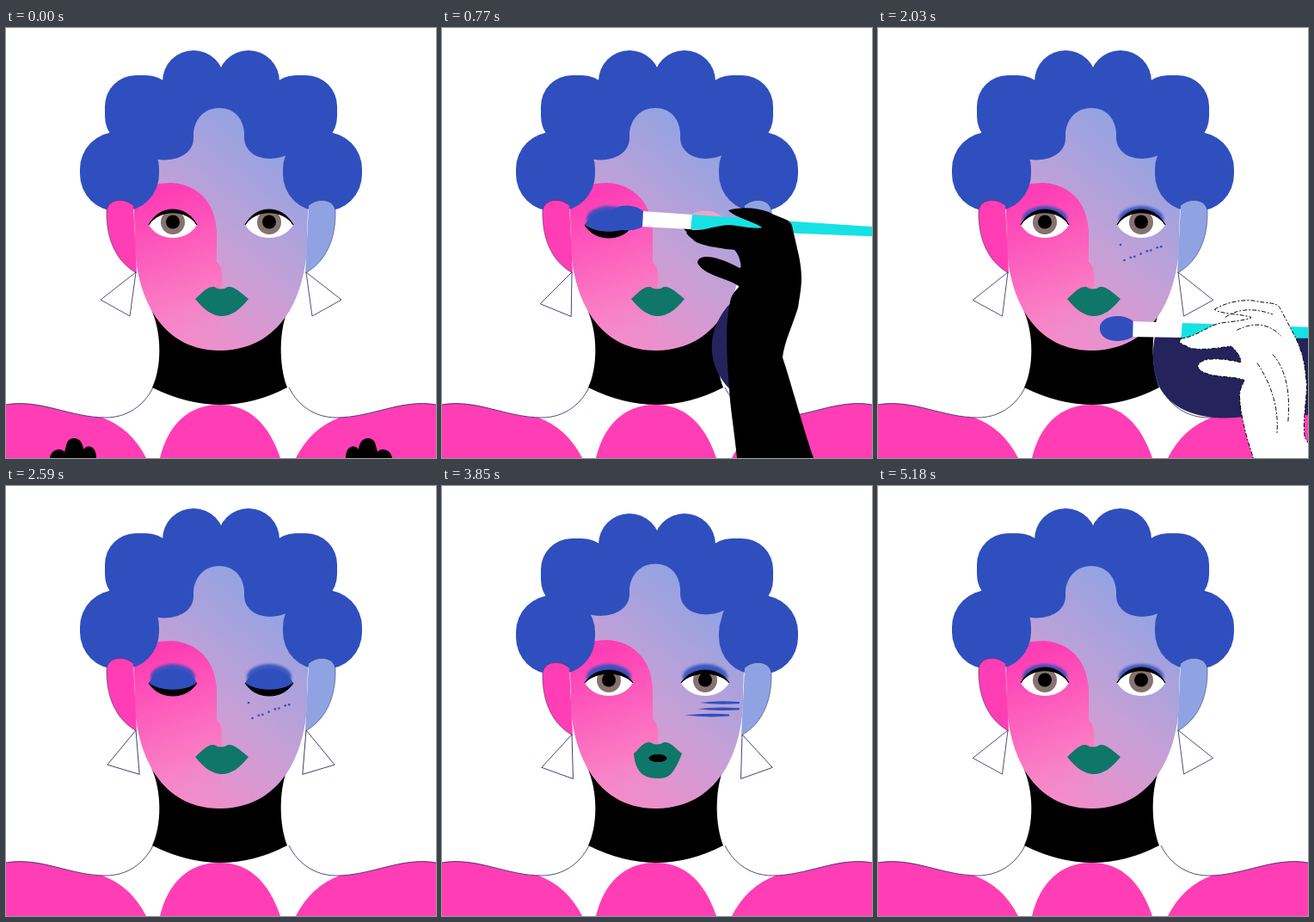
Write an HTML page that moves like this. It is 500 px wide and 500 px high and loops after 5250 ms.

```html
<!DOCTYPE html>
<html lang="en">
<head>
<meta charset="utf-8">
<style>
html, body { margin: 0; width: 100%; height: 100%; overflow: hidden; background: #fff }
svg { display: block; width: 100vw; height: 100vh }
</style>
</head>
<body>
<svg id="stage" viewBox="0 0 500 500"></svg>
<script>
const LOOP = 5250, STEP = 70;
const BLUE = '#2f4fbe', PINK = '#ff3eb5', NAVY = '#25235c', SKY = '#8fa3e3';
const stage = document.getElementById('stage');

const mix = (a, b, u) => a + (b - a) * u;
function ease(t, from, to) {
  const u = Math.min(1, Math.max(0, (t - from) / (to - from)));
  return u * u * (3 - 2 * u);
}
// Rises to 1 after `from` and falls back to 0 before `to`.
const span = (t, from, to, fade) => ease(t, from, from + fade) - ease(t, to - fade, to);

const shape = (d, fill, more = '') => `<path d="${d}" fill="${fill}" ${more}/>`;
const ball = (x, y, r, fill) => `<circle cx="${x}" cy="${y}" r="${r}" fill="${fill}"/>`;
const curl = (x, y, size, r) => `<rect x="${x}" y="${y}" width="${size}" height="${size}" rx="${r}" fill="${BLUE}"/>`;
const group = (transform, body) => `<g transform="${transform}">${body}</g>`;
const move = (x, y, body) => group(`translate(${x} ${y})`, body);
const flip = body => group('translate(500 0) scale(-1 1)', body);
const both = body => body + flip(body);
const line = (color, width) => `stroke="${color}" stroke-width="${width}"`;

const FACE = 'M147 166H353L350 240C352 300 326 374 250 375S148 300 150 240Z';
const FOREHEAD = 'M168 151C190 158 218 150 218 128V122C220 104 232 93 248 93S276 104 277 122V128C278 150 305 158 328 147Q320 165 330 190H170Q177 165 168 151Z';
const EAR = 'M148 206C135 196 119 200 117 212C116 245 128 272 152 285';
const BLUSH = 'M120 195Q170 180 192 180C225 182 245 205 245 240V272Q250 276 251 284V376H120Z';
const FLAT_HAND = 'M349 500L350 470C340 440 330 420 331 380L334 300C336 288 348 288 350 297L354 336L358 262C358 247 369 246 373 252C374 237 388 236 392 244L395 255C399 249 411 252 412 262L422 290C432 340 436 380 433 420C431 440 430 470 432 500V800H349Z';
const GRIP_HAND = 'M333 212C345 208 365 208 380 214C395 222 405 222 407 230L415 265C420 290 418 300 414 325C408 345 398 365 396 383C405 410 420 465 432 500L470 640H360L343 500C340 470 335 440 334 420C332 390 328 350 335 318C338 305 346 303 345 300C330 290 305 288 297 273C298 262 318 264 346 279C350 279 345 262 340 258C320 256 295 252 291 245C281 238 283 234 292 235C305 236 320 229 335 229C350 231 368 234 372 232C365 226 340 220 333 212Z';
const WIPE_HAND = 'M142 500C160 455 172 440 185 400C192 378 205 372 212 363C225 345 250 310 266 290C278 274 297 273 299 282C298 300 270 330 262 345C272 335 298 290 312 279C325 270 338 278 334 292L333 296C344 295 344 305 338 313L320 345C326 342 338 338 336 350C332 375 300 410 291 430C275 440 255 455 245 473L230 500L150 800H20Z';
const CREASES = 'M343 224Q368 215 397 235M352 242Q385 235 400 262M365 285Q380 330 366 370M385 280Q400 310 382 360';

const DEFS = `<defs>
  <linearGradient id="skin" gradientUnits="userSpaceOnUse" x1="170" y1="350" x2="330" y2="150">
    <stop stop-color="#f98ac8"/><stop offset=".5" stop-color="#c6a0d6"/><stop offset="1" stop-color="#93a3e2"/></linearGradient>
  <linearGradient id="blush" gradientUnits="userSpaceOnUse" x1="165" y1="200" x2="225" y2="370">
    <stop stop-color="${PINK}"/><stop offset=".7" stop-color="#fa7dc4"/><stop offset="1" stop-color="#f58ac8" stop-opacity="0"/></linearGradient>
  <filter id="soft"><feGaussianBlur stdDeviation="1.6"/></filter>
  <clipPath id="face">${shape(FACE, '#000')}</clipPath></defs>`;

const BODY = both(shape('M0 438C40 431 75 453 112 453Q145 465 163 500H0Z', PINK))
  + shape('M179 500C188 462 212 438 248 438S306 462 319 500Z', PINK)
  + shape('M160 300H338Q334 313 329 325C317 350 317 392 327 418Q250 458 170 418C181 395 182 355 168 325Z', '#000')
  + both(shape('M171 418C160 440 140 453 116 453C75 453 40 431 0 438', 'none', line(NAVY, .8)));

const HAIR = both(ball(218, 62, 36, BLUE) + curl(115, 55, 84, 36)) + shape('M150 75H350V180H150Z', BLUE);
const LOBES = both(curl(86, 121, 92, 43));
const EARRING = shape('M151 284L110 316L144 335Z', '#fff', line(NAVY, .8));
const NECK_SHADE = shape('M337 318C306 350 304 395 342 427Z', NAVY);
const ARM_SHADE = shape('M322 358H500V450H437C400 458 345 455 326 415C317 390 320 370 322 358Z', NAVY);
const BRUSH = shape('M290 217L620 239V247L289 234Z', '#16e2e4')
  + shape('M233 213L291 217L289 234L232 231Z', '#fff')
  + shape('M234 213C222 202 195 205 195 220C195 238 222 238 233 231Z', BLUE);

function eye(close, shadow, lid, id) {
  const arc = y => `M166 229C178 ${y} 210 ${y} 222 229`;
  const low = mix(210, 249, close), high = mix(205, 240, close);
  const back = y => `C210 ${y} 178 ${y} 166 229Z`;
  return `<clipPath id="${id}"><path d="${arc(low) + back(249)}"/></clipPath>`
    + (shadow ? `<ellipse cx="194" cy="222" rx="26" ry="15" fill="${BLUE}" opacity=".9" filter="url(#soft)"/>` : '')
    + `<g clip-path="url(#${id})"><path d="M160 200h70v50h-70z" fill="#fff"/>${ball(194, 226, 14, '#86726f')}${ball(194, 225.5, 8, '#000')}</g>`
    + (close > .1 ? shape(arc(207) + back(low), shadow ? BLUE : lid) : '')
    + shape(arc(high) + back(low), '#000', line('#000', 1));
}

function lips(purse) {
  const n = (a, b) => mix(a, b, purse);
  const l = n(220, 223), r = n(282, 279), y = n(315, 311), top = n(301, 298), low = n(335, 340);
  const w = n(21, 26), side = n(328, 336);
  return shape(`M${l} ${y}C${l + 8} ${y - 7} 234 ${top - 1} 242 ${top}Q250 ${top + 5} 258 ${top}C266 ${top - 1} ${r - 9} ${y - 7} ${r} ${y}
    C${r - 10} ${side} ${251 + w * .5} ${low} 251 ${low}S${251 - w} ${side} ${l} ${y}Z`, '#0f766a')
    + (purse > .3 ? `<ellipse cx="251" cy="316.5" rx="${n(-3, 10.5)}" ry="${n(-1, 4.5)}" fill="#000"/>` : '');
}

function marks(t) {
  let out = '';
  if (t < 2980)
    for (let i = 0; i < Math.min(9, (t - 1820) / 21); i++)
      out += ball(282 + i * .618 % 1 * 50, 252 + i * .39 % 1 * 19, 1.3, BLUE);
  else if (t < 4480)
    for (let i = 0; i < 3; i++) {
      const x = 300 - i * i * 6 + i * 6, y = 252 + i * 7.3, end = x + 46 * ease(t, 2940, 3080);
      out += shape(`M${x - i * 3} ${y}Q${x + 20} ${y - 3} ${end} ${y - 1}V${y + 1}Q${x + 20} ${y + 3} ${x - i * 3} ${y}Z`, BLUE);
    }
  return out;
}

function eyeBrush(t) {
  const away = 1 - span(t, 630, 1680, 140);
  const stroke = 8 * (1 - Math.cos((t - 770) / 280 * 2 * Math.PI));
  const x = 108 * ease(t, 1050, 1190) + stroke + 300 * away;
  return (x < 40 ? NECK_SHADE : '') + move(x, 140 * away, BRUSH + shape(GRIP_HAND, '#000'));
}

function cheekBrush(t) {
  const away = 1 - span(t, 1750, 2240, 140), drop = ease(t, 1890, 2030);
  const x = mix(93, 63, drop) + 280 * away, y = mix(46, 126, drop) + 120 * away;
  const ink = line('#000', .9) + ' stroke-dasharray="5 2 2 2"';
  const turned = (angle, body) => group(`translate(${x} ${y}) rotate(${angle} 290 225)`, body);
  return (drop > .5 && away < .5 ? ARM_SHADE : '') + turned(-2, BRUSH)
    + turned(-15, shape(GRIP_HAND, '#fff', ink) + shape(CREASES, 'none', ink));
}

function pat(t) {
  const away = 1 - span(t, 70, 560, 160);
  return both(move(4 + 33 * away, 270 * away - 26 - 6 * Math.cos((t - 280) / 140 * Math.PI), shape(FLAT_HAND, '#000')));
}

function smear(t) {
  const away = 1 - span(t, 2870, 3360, 200);
  return (away < .1 ? NECK_SHADE : '') + move(22 * away, 280 * away, shape(FLAT_HAND, '#000'));
}

function wipe(t) {
  const away = 1 - span(t, 4130, 5040, 300), rub = Math.sin((t - 4480) / 280 * 2 * Math.PI);
  return move(-80 * away - 8 * rub, 310 * away + 8 * rub, ball(316, 290, 57, '#fff') + shape(WIPE_HAND, '#000'));
}

function hands(t) {
  if (t <= 560) return pat(t);
  if (t <= 1680) return eyeBrush(t);
  if (t <= 2240) return cheekBrush(t);
  if (t <= 3360) return smear(t);
  return wipe(t);
}

function draw(t) {
  const tilt = span(t, 3220, 4130, 270), purse = span(t, 2870, 4130, 270);
  const close = Math.max(span(t, 140, 560, 70), span(t, 630, 1680, 70), span(t, 2450, 2660, 70),
    span(t, 4060, 5110, 140), .12 * tilt);
  const swing = -6.3 * (1 - Math.cos(2 * Math.PI * t / 1050));
  const rim = line(NAVY, .5);

  stage.innerHTML = DEFS + BODY
    + move(0, 6 * tilt, HAIR)
    + move(0, 5 * tilt, both(group(`rotate(${swing} 151 284)`, EARRING)))
    + move(0, -2.5 * tilt, shape(FOREHEAD, 'url(#skin)'))
    + shape(FACE, 'url(#skin)')
    + `<g clip-path="url(#face)">${move(0, -tilt, shape(BLUSH, 'url(#blush)'))}</g>`
    + move(0, 6 * tilt, LOBES)
    + move(0, 5 * tilt, shape(EAR, PINK, rim) + flip(shape(EAR, SKY, rim)))
    + eye(close, t >= 770, '#ff72c0', 'leftEye')
    + flip(eye(close, t >= 1190, '#efa5c8', 'rightEye'))
    + lips(purse) + marks(t) + hands(t);
}

let shown = -1;
function tick() {
  const t = Math.floor(performance.now() % LOOP / STEP) * STEP;
  if (t !== shown) draw(shown = t);
  requestAnimationFrame(tick);
}
tick();
</script>
</body>
</html>
```
